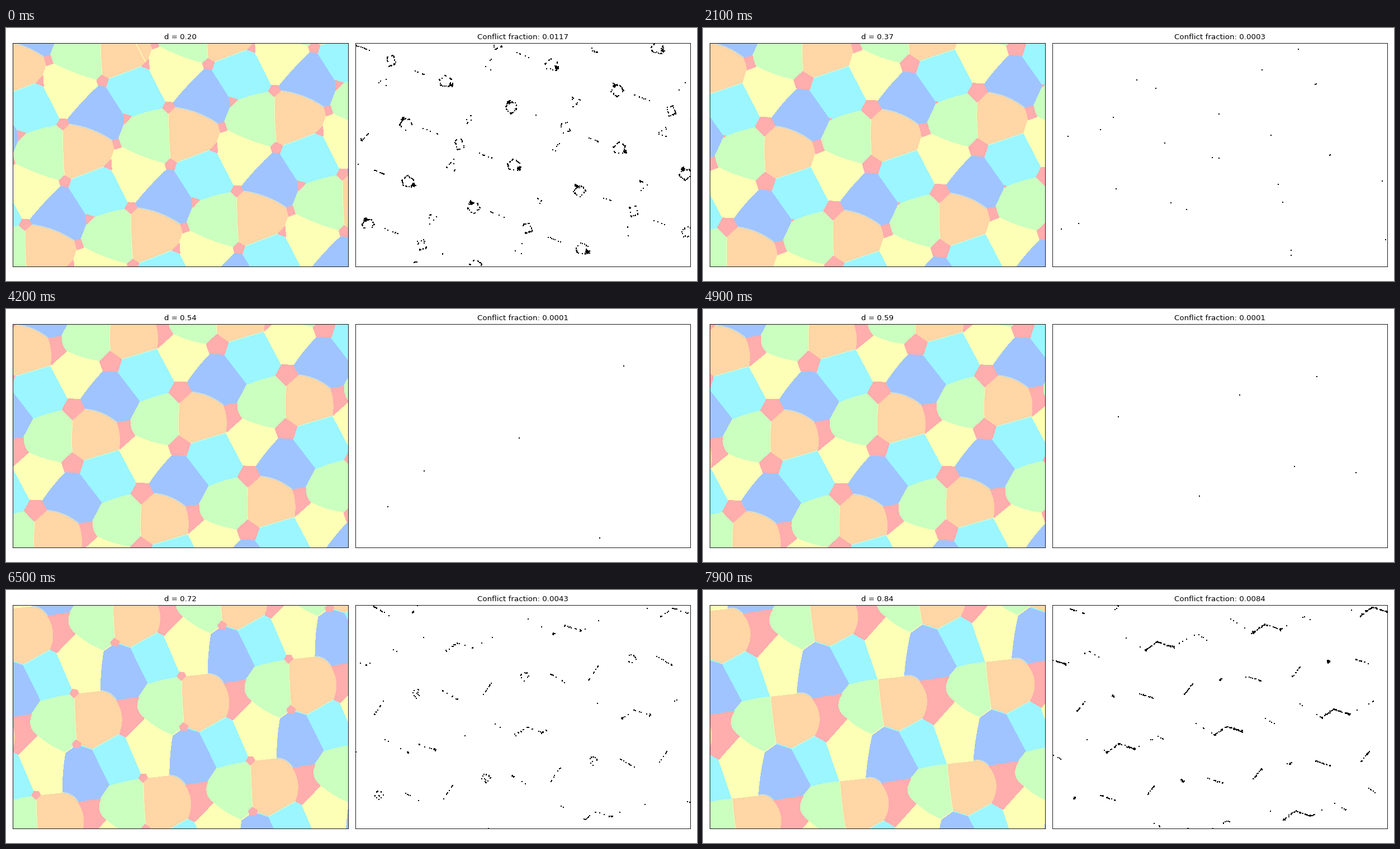
These frames come from a looping animation (1236x453 px, 8000 ms). A matplotlib script:

```python
import numpy as np
import matplotlib.pyplot as plt
from matplotlib.animation import FuncAnimation
from matplotlib.collections import LineCollection, PolyCollection

W, H, DPI = 1236, 453, 80
FRAMES, INTERVAL = 80, 100
LEFT, RIGHT, TOP = 12.3, 624.6, 27   # panel corners on the stage
PW, PH = 599.8, 400

PINK = "#FFADAD"
FILL = {"O": "#FFD6A5", "Y": "#FDFFB6", "G": "#CAFFBF", "C": "#9BF6FF", "B": "#A0C4FF"}

# Five pink gaps per lattice cell: where each starts, passes at MIDWAY and ends.
MIDWAY = 0.62
CENTRES = {
    1: [(295, 245), (313, 247), (323, 244)],
    2: [(291, 142), (315, 149), (313, 159)],
    3: [(374, 215), (397, 223), (408, 227)],
    4: [(387, 178), (407, 188), (418, 183)],
    5: [(405, 132), (436, 135), (455, 137)],
}
# Edges that leave each gap, clockwise, named after the tiles they part.
RINGS = {1: "GO CO BC BY GY", 2: "CY BY BO GO CG", 3: "OY CY CO",
         4: "BG GY OY BO", 5: "BC CG BG"}
# Each tile runs clockwise over four gaps: gap, lattice shift, tile across the edge.
TILES = {
    "O": [(2, 0, 0, "B"), (4, 0, 0, "Y"), (3, 0, 0, "C"), (1, 0, 0, "G")],
    "B": [(1, 1, -1, "C"), (5, 0, 0, "G"), (4, 0, 0, "O"), (2, 0, 0, "Y")],
    "G": [(2, 0, 0, "O"), (1, 0, 0, "Y"), (4, -1, 0, "B"), (5, -1, 0, "C")],
    "C": [(3, 0, 0, "Y"), (2, 0, 1, "G"), (5, -1, 1, "B"), (1, 0, 0, "O")],
    "Y": [(4, 0, 0, "G"), (1, 1, 0, "B"), (2, 0, 1, "C"), (3, 0, 0, "O")],
}
BENDS = {"BO": ("B", 10), "GY": ("Y", 5), "BY": ("Y", 3), "CG": ("C", 3), "GO": ("G", 2)}
# Where edges end once the gaps 1 and 2 close, relative to the gap; others meet in it.
EAST, SOUTHEAST, SOUTHWEST = (46, -5), (28, 9), (-21, 15)
CLOSED = {"2BO": EAST, "2BY": EAST, "1CO": SOUTHEAST, "1BC": SOUTHEAST,
          "1BY": SOUTHWEST, "1GY": SOUTHWEST}
SEAMS = ("BO", "CO", "GO")


def smooth(k, start, end):
    t = np.clip((k - start) / (end - start), 0, 1)
    return t * t * (3 - 2 * t)


def conflict_fraction(k):
    keys = [0, 13, 21, 34, 49, 65, 79]
    values = [0.0117, 0.0006, 0.0003, 0.0001, 0.0001, 0.0043, 0.0084]
    return np.exp(np.interp(k, keys, np.log(values)))


def lattice(s):
    a = np.array([189.3 + 3 * s, -30 - s])
    b = np.array([122 + 1.7 * s, 149.8 + 1.9 * s])
    return a, b


def gap_radii(k):
    s = k / (FRAMES - 1)
    closing = np.interp(k, [0, 21, 49, 65, 75], [11, 18, 21, 8, 0])
    return {1: closing, 2: closing,
            3: max(0, 10 - 0.55 * k) + 15 * smooth(k, 49, 79),
            4: 10 + 26 * s ** 1.5,
            5: max(0, 10 - 0.36 * k)}


def unit(v):
    return v / max(np.hypot(*v), 1e-6)


def normal(p, q):
    """Outward normal of a side of a clockwise outline."""
    dx, dy = q - p
    return unit(np.array([dy, -dx]))


def bent(p, q, bend):
    u = np.linspace(0, 1, 9)[:, None]
    return p + u * (q - p) + 4 * u * (1 - u) * bend * normal(p, q)


def geometry(k):
    """Tile outlines, pink outlines, edges, gap rims and gap centres of one cell."""
    s = k / (FRAMES - 1)
    a, b = lattice(s)
    centre = {g: np.array([np.interp(s, [0, MIDWAY, 1], axis) for axis in zip(*path)])
              for g, path in CENTRES.items()}
    radius = gap_radii(k)
    closed = smooth(k, 49, 65)
    tiles, edges, rim = {}, {}, {}

    def edge_end(gap, pair, node, knee):
        offset = radius[gap] * unit(knee - node)
        rim[f"{gap}{pair}"] = centre[gap] + offset
        if gap in (1, 2):
            target = np.array(CLOSED.get(f"{gap}{pair}", (0, 0)))
            offset = offset + closed * (target - offset)
        return node + offset

    for tile, stops in TILES.items():
        nodes = [centre[g] + i * a + j * b for g, i, j, _ in stops]
        outline = []
        for n, (gap, _, _, other) in enumerate(stops):
            m = (n + 1) % len(stops)
            p, q = nodes[n], nodes[m]
            pair = "".join(sorted(tile + other))
            toward, bend = BENDS.get(pair, (tile, 0))
            if toward == tile:
                bend = -bend
            knee = (p + q) / 2 + 2 * bend * normal(p, q)
            edges[pair] = bent(edge_end(gap, pair, p, knee),
                               edge_end(stops[m][0], pair, q, knee), bend / 2)
            outline += [p, *edges[pair]]
        tiles[tile] = np.array(outline)

    pinks = [np.array([rim[f"{g}{pair}"] for pair in RINGS[g].split()])
             for g in (1, 2, 3, 5)]
    # Gap 4 stretches down until it swallows gap 3; its sides sag inward.
    merged, sag = smooth(k, 25, 45), -11 * s * s
    tip_right, tip_left = (rim["4OY"] + merged * (rim[n] - rim["4OY"])
                           for n in ("3CY", "3CO"))
    pinks.append(np.vstack([bent(rim["4BG"], rim["4GY"], sag),
                            bent(tip_right, tip_left, 0),
                            bent(tip_left, rim["4BO"], sag)]))
    return tiles, pinks, edges, rim, centre


def copies(a, b):
    """Lattice shifts whose cells can reach the panel."""
    for i in range(-4, 5):
        for j in range(-4, 5):
            shift = i * a + j * b
            x, y = shift + (350, 200)
            if -190 < x < 820 and -180 < y < 630:
                yield i, j, shift


def conflict_strokes(k, edges, rim, centre):
    """Strokes as (start, end, weight, spread) for one cell."""
    def along(pair, u, v, weight):
        p, q = edges[pair][0], edges[pair][-1]
        return p + u * (q - p), p + v * (q - p), weight, 0.5

    def ring(gap, weight):
        names = [f"{gap}{pair}" for pair in RINGS[gap].split()]
        return [(rim[n], rim[m], weight, 0.6)
                for n, m in zip(names, names[1:] + names[:1])]

    if k < 45:
        strokes = [(rim["1BC"] + (3, -3), rim["1BC"] + (5, -4), 4, 2),
                   (rim["2CY"], rim["2CY"] + (1, 1), 4, 2),
                   along("BO", 0.4, 0.75, 1.2), along("GY", 0.35, 0.65, 1.2)]
        for gap in RINGS:
            strokes += ring(gap, 0.4 if gap in (3, 5) else 0.9)
        return strokes
    late = smooth(k, 55, 79)
    west, east = (centre[1] + CLOSED[n] for n in ("1GY", "1CO"))
    return ring(2, 0.6 * (1.1 - late)) + [
        along("BO", 0.1, 1, 2), along("BG", 0, 1, 2),
        (centre[1], west, 3 * late, 0.7), (centre[1], east, 3 * late, 0.7),
        (west, west, 0.7, 1.3), (east, east, 0.7, 1.3),
        (centre[2], centre[2], 0.8 * late, 1.8),
        along("CO", 0, 1, 0.6 * late), along("GY", 0.1, 0.9, 0.5 * late),
        (rim["3CO"], rim["3CY"], 0.4 * late, 0.5)]


def conflict_image(k, fraction, strokes, a, b):
    rows, cols = PH, round(PW)
    img = np.zeros((rows, cols))
    start, end = (np.array([s[c] for s in strokes]) for c in (0, 1))
    weight, spread = (np.array([s[c] for s in strokes]) for c in (2, 3))
    share = weight.cumsum() / weight.sum()
    cells = np.hypot(*a) * np.hypot(*b) * 0.86
    count = round(fraction * cells / 2.4)
    for i, j, shift in copies(a, b):
        rng = np.random.default_rng([i + 9, j + 9])
        pick = np.minimum(np.searchsorted(share, rng.random(300)), len(share) - 1)
        u = rng.beta(0.6, 0.6, (300, 1))
        noise = rng.normal(0, 0.8, (300, 2)) * spread[pick][:, None]
        pts = start[pick] + u * (end[pick] - start[pick]) + noise + shift
        for x, y in np.floor(pts[:count] - (LEFT, TOP)).astype(int):
            if 0 <= x < cols and 0 <= y < rows:
                img[y:y + 2, x:x + 2] = 1
    return img


def panel(x):
    ax = fig.add_axes([x / W, 1 - (TOP + PH) / H, PW / W, PH / H])
    ax.set(xticks=[], yticks=[])
    return ax


plt.rcParams["font.family"] = "DejaVu Sans"
fig = plt.figure(figsize=(W / DPI, H / DPI), dpi=DPI, facecolor="white")
ax_map, ax_hit = panel(LEFT), panel(RIGHT)
shapes = PolyCollection([], linewidths=0.5, antialiaseds=False)
seam_lines = LineCollection([], colors=FILL["Y"], linewidths=0.6)
gaps = PolyCollection([], facecolors=PINK, edgecolors="none", antialiaseds=False)
for layer, artist in enumerate((shapes, seam_lines, gaps)):
    artist.set_zorder(1 + layer / 10)
    ax_map.add_collection(artist)
hits = ax_hit.imshow(np.zeros((PH, round(PW))), cmap="gray_r", vmin=0, vmax=1,
                     interpolation="nearest",
                     extent=(LEFT, LEFT + PW, TOP + PH, TOP))
for ax in (ax_map, ax_hit):
    ax.set(xlim=(LEFT, LEFT + PW), ylim=(TOP + PH, TOP), aspect="auto")
map_title = ax_map.set_title("", fontsize=12)
hit_title = ax_hit.set_title("", fontsize=12)


def draw(k):
    a, b = lattice(k / (FRAMES - 1))
    tiles, pinks, edges, rim, centre = geometry(k)
    shifts = [shift for _, _, shift in copies(a, b)]
    colors = [FILL[tile] for tile in tiles for _ in shifts]
    shapes.set_verts([outline + d for outline in tiles.values() for d in shifts])
    shapes.set_facecolor(colors)
    shapes.set_edgecolor(colors)
    seam_lines.set_segments([edges[pair] + d for pair in SEAMS for d in shifts])
    gaps.set_verts([outline + d for outline in pinks for d in shifts])

    fraction = conflict_fraction(k)
    strokes = conflict_strokes(k, edges, rim, centre)
    hits.set_data(conflict_image(k, fraction, strokes, a, b))
    map_title.set_text(f"d = {0.2 + 0.00805 * k:.2f}")
    hit_title.set_text(f"Conflict fraction: {fraction:.4f}")
    return shapes, seam_lines, gaps, hits, map_title, hit_title


anim = FuncAnimation(fig, draw, frames=FRAMES, interval=INTERVAL, repeat=True)
plt.show()
```
